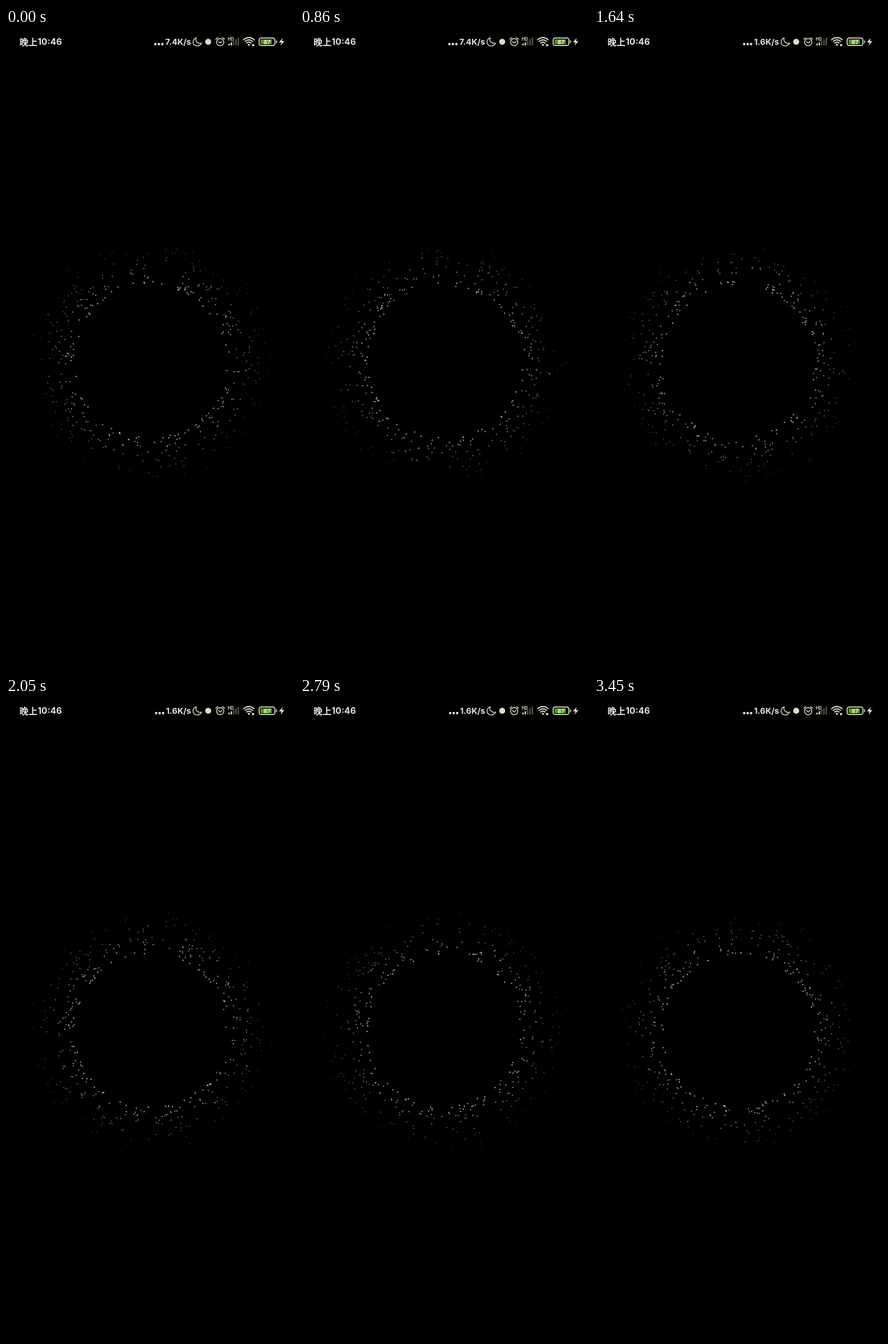
Animation, 480 px wide and 1067 px high, one loop 3490 ms. Source, as an HTML page with a canvas:

```html
<!DOCTYPE html>
<html lang="zh">
<head>
<meta charset="utf-8">
<title>Particle ring</title>
<style>
html, body { margin: 0; width: 100%; height: 100%; overflow: hidden; background: #000; }
canvas { display: block; width: 100vw; height: 100vh; }
</style>
</head>
<body>
<canvas id="stage" width="480" height="1067"></canvas>
<script>
const ctx = document.getElementById('stage').getContext('2d');
const LOOP = 3490, HOLD = 370, STEP = 41.07, SPEED_CHANGE = 1400;
const CX = 240.5, CY = 555.5, RING = 126, REACH = 96, COUNT = 440;
const LIGHT = '#dedec2', TEXT = '#e4e4e6', DIM = '#55554a';
const TONES = ['226,226,178', '200,200,130', '232,232,222', '146,146,240'];

function seeded(seed) {
  return () => {
    seed = (seed + 0x6D2B79F5) | 0;
    let n = Math.imul(seed ^ (seed >>> 15), 1 | seed);
    n = (n + Math.imul(n ^ (n >>> 7), 61 | n)) ^ n;
    return ((n ^ (n >>> 14)) >>> 0) / 4294967296;
  };
}

const rand = seeded(46);
const particles = Array.from({ length: COUNT }, () => {
  const tone = rand();
  return {
    angle: rand() * Math.PI * 2,
    base: RING + rand() * 4 - 1,
    limit: REACH * Math.sqrt(rand()),
    phase: rand(),
    speed: 0.04 + rand() * 0.045,
    tone: TONES[tone < 0.5 ? 0 : tone < 0.72 ? 1 : tone < 0.9 ? 2 : 3]
  };
});

function drawParticles(time) {
  for (const p of particles) {
    const offset = (p.phase * p.limit + p.speed * time) % p.limit;
    const fade = 1 - offset / REACH;
    const r = p.base + offset;
    ctx.fillStyle = `rgba(${p.tone},${(0.92 * fade ** 0.9).toFixed(3)})`;
    disc(CX + r * Math.cos(p.angle), CY + r * Math.sin(p.angle), 0.65 + 0.4 * fade);
  }
}

function disc(x, y, r) {
  ctx.beginPath();
  ctx.arc(x, y, r, 0, Math.PI * 2);
  ctx.fill();
}

function line(...pts) {
  ctx.beginPath();
  for (let i = 0; i < pts.length; i += 2) ctx.lineTo(pts[i], pts[i + 1]);
  ctx.stroke();
}

function arc(x, y, r, from, to) {
  ctx.beginPath();
  ctx.arc(x, y, r, from, to);
  ctx.stroke();
}

function label(text, x, y, font, color = TEXT, align = 'left') {
  ctx.font = font;
  ctx.fillStyle = color;
  ctx.textAlign = align;
  ctx.fillText(text, x, y);
}

function drawMoon() {
  ctx.lineWidth = 1.4;
  ctx.beginPath();
  ctx.moveTo(317, 16.3);
  ctx.bezierCurveTo(310.5, 18.5, 310, 27, 316, 29.3);
  ctx.bezierCurveTo(320, 30.8, 324.5, 29, 326, 25.2);
  ctx.bezierCurveTo(319.5, 27, 315, 22, 317, 16.3);
  ctx.stroke();
}

function drawAlarm() {
  ctx.lineWidth = 1.5;
  arc(357, 23.5, 6, 0, Math.PI * 2);
  line(349.8, 18.6, 353, 16);
  line(364.2, 18.6, 361, 16);
  line(354.2, 22.5, 357, 25, 359.8, 22.5);
}

function drawSignal() {
  label('HD', 369.5, 20.5, 'bold 7px Inter, sans-serif', LIGHT);
  [3, 5, 8, 10.5, 13].forEach((h, i) => {
    ctx.fillStyle = i < 2 ? LIGHT : DIM;
    ctx.fillRect(370.5 + i * 3.9, 29 - h, 2.3, h);
  });
}

function drawWifi() {
  ctx.lineWidth = 1.9;
  const a = Math.PI * 0.25, b = Math.PI * 0.75;
  for (const r of [12.5, 8.7, 5]) arc(404.8, 28.5, r, -b, -a);
  ctx.fillStyle = LIGHT;
  disc(404.8, 28, 1.8);
  disc(411.8, 28.6, 2);
}

function drawBattery() {
  ctx.lineWidth = 1.7;
  ctx.beginPath();
  ctx.roundRect(421.9, 16.6, 26.3, 12.6, 3.5);
  ctx.stroke();
  ctx.fillStyle = '#4f9d12';
  ctx.fillRect(424.3, 19, 18.7, 7.8);
  ctx.fillStyle = LIGHT;
  ctx.fillRect(450, 20.6, 1.6, 4.6);
  label('87', 435, 26.5, 'bold 9.5px Inter, sans-serif', '#f0f0e8', 'center');

  ctx.beginPath();
  for (const [x, y] of [[461, 16.5], [455, 24], [459, 24], [457.6, 29.5], [464, 21.7], [460, 21.7]]) ctx.lineTo(x, y);
  ctx.fillStyle = LIGHT;
  ctx.fill();
}

function drawStatus(time) {
  const fast = time < SPEED_CHANGE;
  label('晚上', 22.5, 28.6, 'bold 15px "Noto Sans CJK SC", "Noto Sans CJK", sans-serif');
  label('10:46', 52.8, 28.4, 'bold 14.6px Inter, sans-serif');
  label(fast ? '7.4K/s' : '1.6K/s', 308.5, 28.2, 'bold 13.7px Inter, sans-serif', TEXT, 'right');
  for (let i = 0; i < 3; i++) disc((fast ? 249 : 250.3) + i * 5.8, 26.8, 2.1);

  ctx.strokeStyle = ctx.fillStyle = LIGHT;
  ctx.lineCap = ctx.lineJoin = 'round';
  disc(337, 23, 5);
  drawMoon();
  drawAlarm();
  drawSignal();
  drawWifi();
  drawBattery();
}

function frame(now) {
  const time = now % LOOP;
  // The ring rests first, then advances in even steps.
  const steps = time < HOLD ? 0 : 1 + Math.floor((time - HOLD) / STEP + 0.1);
  ctx.fillStyle = '#000';
  ctx.fillRect(0, 0, 480, 1067);
  drawParticles(steps * STEP);
  drawStatus(time);
  requestAnimationFrame(frame);
}
frame(performance.now());
</script>
</body>
</html>
```
